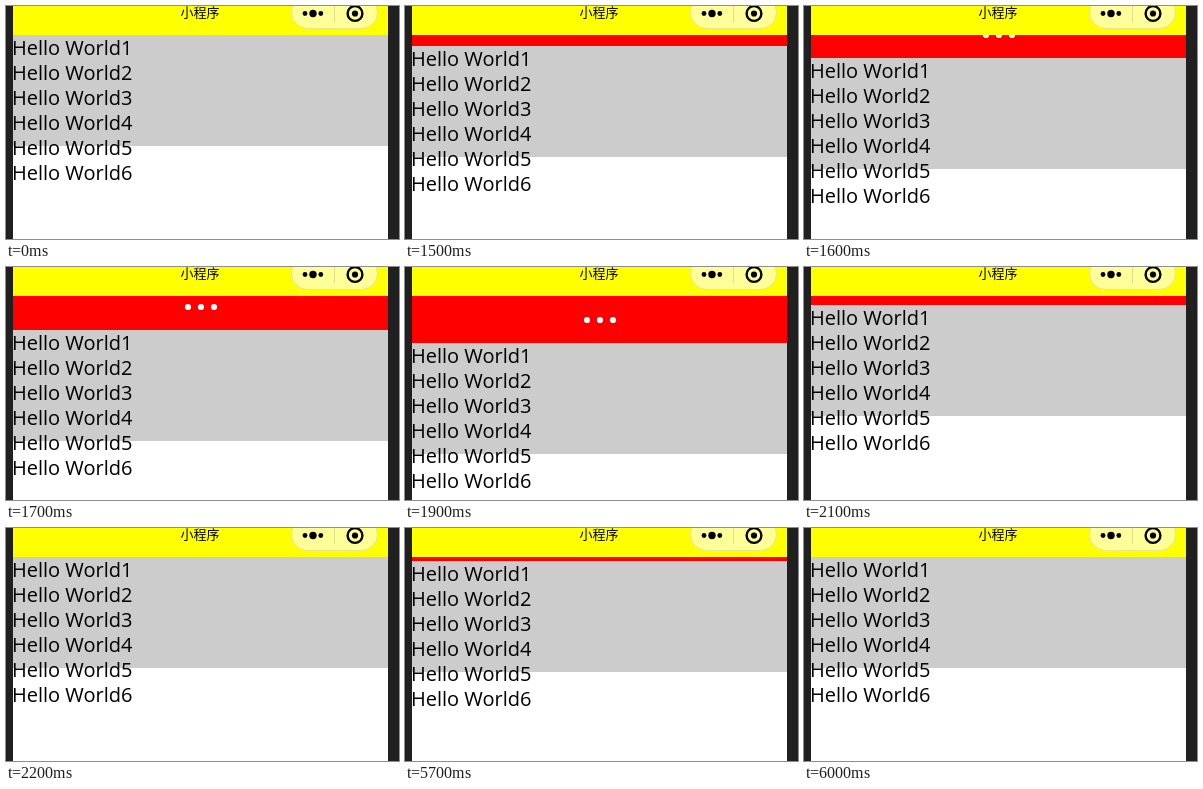
Write an HTML page that moves like this. It is 393 by 233 pixels and loops after 8000 ms.

```html
<!DOCTYPE html>
<html lang="zh-CN">
<head>
<meta charset="utf-8">
<title>Pull to refresh</title>
<style>
  html, body { margin: 0; width: 100%; height: 100%; overflow: hidden; background: #202020; }
  svg { display: block; width: 393px; height: 233px; }
  .line { font: 20px "Open Sans", "Noto Sans", sans-serif; }
  .title { font: 13px "Noto Sans CJK SC", "Noto Sans CJK", sans-serif; text-anchor: middle; }
</style>
</head>
<body>
<svg viewBox="0 0 393 233">
  <defs>
    <clipPath id="screen"><rect x="7" y="0" width="375" height="233"/></clipPath>
  </defs>
  <rect width="393" height="233" fill="#202020"/>
  <g clip-path="url(#screen)">
    <rect x="7" y="29" width="375" height="204" fill="#f00"/>
    <g id="page">
      <g fill="#fff">
        <circle cx="182" cy="6" r="3.1"/>
        <circle cx="195" cy="6" r="3.1"/>
        <circle cx="208" cy="6" r="3.1"/>
      </g>
      <rect x="7" y="29" width="375" height="204" fill="#fff"/>
      <rect x="7" y="29" width="375" height="111" fill="#ccc"/>
      <g id="lines"></g>
    </g>
    <rect x="7" y="0" width="375" height="29" fill="#ff0"/>
    <text class="title" x="194" y="10.5">小程序</text>
    <rect x="285.5" y="-9.5" width="86" height="32" rx="16" fill="#ffff99" stroke="#e6e68a"/>
    <path d="M328.5 -2V16" stroke="#dede86"/>
    <circle cx="299" cy="7.5" r="2.4"/>
    <circle cx="307" cy="7.5" r="3.7"/>
    <circle cx="314.8" cy="7.5" r="2.4"/>
    <circle cx="349" cy="7.5" r="7.4" fill="none" stroke="#000" stroke-width="2.4"/>
    <circle cx="349" cy="7.5" r="3.1"/>
  </g>
</svg>
<script>
  const LOOP = 8000, STEP = 100;
  // Each pull: start time and the page offset in px at every step
  const pulls = [
    { start: 1500, offsets: [11, 23, 34, 43, 47, 28, 9] },
    { start: 5700, offsets: [4, 3, 1] }
  ];

  const page = document.getElementById("page");
  const lines = document.getElementById("lines");
  for (let i = 0; i < 6; i++) {
    const text = document.createElementNS("http://www.w3.org/2000/svg", "text");
    text.setAttribute("class", "line");
    text.setAttribute("x", 6);
    text.setAttribute("y", 49 + i * 25);
    text.textContent = "Hello World" + (i + 1);
    lines.append(text);
  }

  function offsetAt(t) {
    for (const { start, offsets } of pulls) {
      const y = offsets[Math.floor((t - start) / STEP)];
      if (y !== undefined) return y;
    }
    return 0;
  }

  function draw(t) {
    page.setAttribute("transform", `translate(0 ${offsetAt(t)})`);
  }

  const begin = performance.now();
  function tick() {
    draw((performance.now() - begin) % LOOP);
    requestAnimationFrame(tick);
  }
  draw(0);
  requestAnimationFrame(tick);
</script>
</body>
</html>
```
